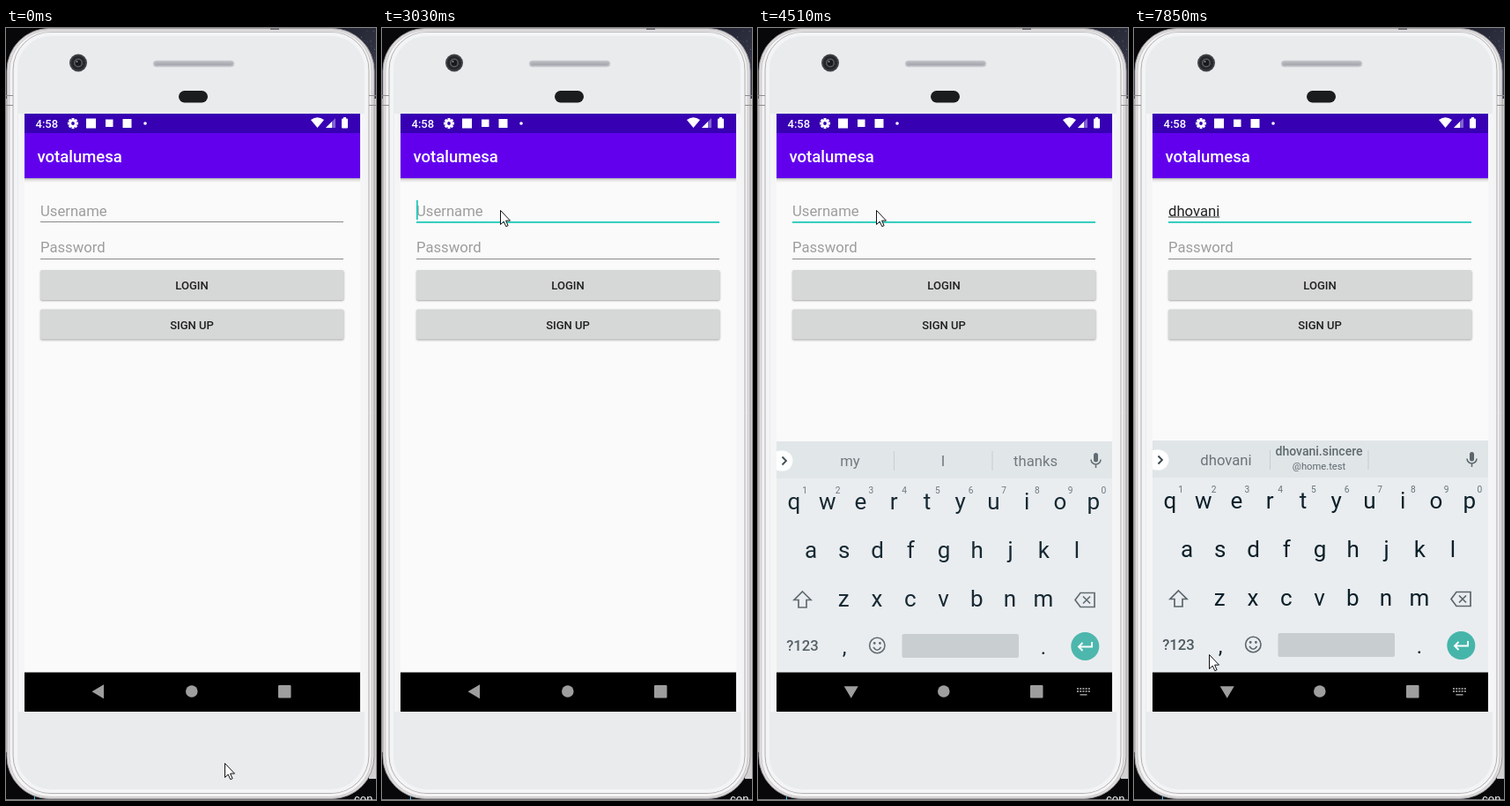
Recreate the animation shown at these times as an HTML page with a canvas. Size 420x874 px, loop 8 s.

```html
<!DOCTYPE html>
<html lang="en">
<head>
<meta charset="utf-8">
<title>Login form</title>
<style>
  html, body { margin: 0; width: 100%; height: 100%; overflow: hidden; background: #0a0a0c; }
  canvas { display: block; width: 420px; height: 874px; }
</style>
</head>
<body>
<canvas id="stage"></canvas>
<script>
const W = 420, H = 874, LOOP = 8000;
const canvas = document.getElementById('stage');
const ctx = canvas.getContext('2d');
const dpr = window.devicePixelRatio || 1;
canvas.width = W * dpr;
canvas.height = H * dpr;

const TEAL = '#22c9b8', GREY = '#5b666c', INK = '#0c2029';
const NAME = 'dhovani';

// Each track is a list of [start time, ...values]; values hold until the next entry.
const pointerTrack = [
  [0, 248, 832], [720, 244, 812], [870, 241, 775], [990, 240, 736],
  [1140, 239, 702], [1260, 238, 669], [1410, 238, 647], [1710, 212, 480],
  [1830, 165, 281], [2230, 143, 195], [2480, 141, 194], [2630, 137, 200],
  [2750, 134, 206], [7310, 127, 262], [7430, 107, 402], [7580, 96, 580],
  [7700, 85, 709]
];
const caretTrack = [
  [0, false], [3030, true], [4510, false], [4910, true], [5500, false],
  [5650, true], [6880, false], [7310, true], [7850, false]
];
const typedTrack = [[0, 0], [5650, 1], [5800, 3], [6080, 4], [6230, 6], [6360, 7]];
const keyboardTrack = [[0, 0, 0], [4390, 0.65, 6], [4510, 0.95, 1], [4630, 1, 0]];
const navTrack = [[0, 0, false], [4150, 0.5, false], [4270, 1, true]];
const hintTrack = [
  [0, 'my', 'I', 'thanks'], [5650, 'd', 'do', 'did'], [5800, 'dho', '', ''],
  [6080, 'dhov', '', 'shovel'], [6230, 'dhovan', '', ''], [6360, NAME, '', '']
];

function at(track, t) {
  let hit = track[0];
  for (const entry of track) if (entry[0] <= t) hit = entry;
  return hit.slice(1);
}

function rect(x, y, w, h, color) {
  ctx.fillStyle = color;
  ctx.fillRect(x, y, w, h);
}

function roundBox(x, y, w, h, r, fill, stroke, width = 1) {
  ctx.beginPath();
  ctx.roundRect(x, y, w, h, r);
  if (fill) { ctx.fillStyle = fill; ctx.fill(); }
  if (stroke) { ctx.strokeStyle = stroke; ctx.lineWidth = width; ctx.stroke(); }
}

function disc(x, y, r, color) {
  ctx.beginPath();
  ctx.arc(x, y, r, 0, Math.PI * 2);
  ctx.fillStyle = color;
  ctx.fill();
}

function fillPath(d, color) {
  ctx.fillStyle = color;
  ctx.fill(new Path2D(d));
}

function strokePath(d, color, width) {
  ctx.strokeStyle = color;
  ctx.lineWidth = width;
  ctx.stroke(new Path2D(d));
}

function setFont(size, weight = 400) {
  ctx.font = `${weight} ${size}px Roboto, sans-serif`;
}

function text(str, x, y, size, color, align = 'left', weight = 400) {
  setFont(size, weight);
  ctx.textAlign = align;
  ctx.fillStyle = color;
  ctx.fillText(str, x, y);
}

function gradient(x0, y0, x1, y1, stops) {
  const g = ctx.createLinearGradient(x0, y0, x1, y1);
  stops.forEach(([p, c]) => g.addColorStop(p, c));
  return g;
}

function drawBackdrop() {
  rect(0, 0, W, H, '#08080a');
  rect(370, 0, 50, 80, gradient(370, 0, 420, 60, [[0, '#20222f'], [1, '#393a4c']]));
  let seed = 7;
  const random = () => (seed = seed * 16807 % 2147483647) / 2147483647;
  for (let i = 0; i < 45; i++) {
    rect(385 + random() * 35, random() * 60, 1, 1, i % 3 ? '#4c4b5e' : '#74707c');
  }
  rect(0, 80, 10, 740, '#cfcccd');
  rect(412, 80, 8, 770, '#d3d0d1');
  rect(0, 873, W, 1, '#77777b');
  text('(', 31, 877, 12, '#65b8ec');
  text('con', 395, 877, 13, '#f2f2f2');
}

function drawPhone() {
  roundBox(1, 0.5, 417, 872, 48, '#dfddde', '#9c999b');
  roundBox(4, 2.5, 411, 868, 46, '#f5f4f5', '#cbc8ca');
  roundBox(8, 4.5, 404, 862, 43, '#e9ebed', '#b3b0b2');
  roundBox(11, 7, 398, 857, 40, null, '#f3f4f5', 4);
  rect(0, 76, 8, 1, '#8e8b8d');
  rect(0, 87, 8, 1, '#8e8b8d');
  rect(412, 76, 8, 1, '#8e8b8d');
  rect(412, 87, 8, 1, '#8e8b8d');
  rect(300, 0, 10, 2, '#77747a');
  rect(14, 97, 7, 677, '#f5f5f6');
  rect(402, 97, 6, 677, '#f5f5f6');

  disc(82, 39.5, 10, '#404247');
  disc(82, 39.5, 8, '#25262a');
  disc(82, 39.5, 5, '#5a5c62');
  disc(82, 39.5, 3.5, '#18191c');
  disc(80.5, 38, 1, '#8c9098');

  roundBox(167, 37, 92, 7, 3.5, '#b6b7bd', '#d5d6d9');
  rect(170, 40, 86, 2, '#a9aab1');
  roundBox(196, 71, 33, 13.5, 6.75, '#1b1c1e');
}

function drawGear(x, y) {
  ctx.save();
  ctx.translate(x, y);
  for (let i = 0; i < 8; i++) {
    rect(-1.5, -6, 3, 4, '#fff');
    ctx.rotate(Math.PI / 4);
  }
  ctx.restore();
  disc(x, y, 4.4, '#fff');
  disc(x, y, 1.9, '#3700b3');
}

function drawBars() {
  rect(21, 97, 381, 22, '#3700b3');
  text('4:58', 33.5, 112.5, 13, '#fff', 'left', 500);
  drawGear(76, 108);
  rect(91, 102.5, 11, 11, '#fff');
  rect(113, 103.5, 8.5, 8.5, '#fff');
  rect(132.5, 103, 10, 10, '#fff');
  disc(158, 108, 1.8, '#fff');
  fillPath('M346 104 Q353.5 98.5 361 104 L353.5 113 Z', '#fff');
  fillPath('M374 102 V113 H363 Z', '#8062cf');
  fillPath('M370 106 V113 H363 Z', '#fff');
  roundBox(381, 102.5, 7, 11, 1, '#fff');
  rect(383, 101, 3, 2, '#fff');

  rect(21, 119, 381, 51, '#6200ee');
  text('votalumesa', 35.5, 152, 18.5, '#fff', 'left', 500);
}

function drawButton(label, y) {
  ctx.save();
  ctx.shadowColor = 'rgba(0,0,0,.32)';
  ctx.shadowBlur = 2 * dpr;
  ctx.shadowOffsetY = dpr;
  roundBox(39, y, 344.5, 34, 2, '#d6d7d7');
  ctx.restore();
  text(label, 211, y + 22, 13, '#1f1f1f', 'center', 500);
}

function drawForm(t) {
  rect(21, 170, 381, 560, '#fafafa');
  rect(21, 170, 381, 5, gradient(0, 170, 0, 175,
    [[0, 'rgba(0,0,0,.3)'], [0.4, 'rgba(0,0,0,.1)'], [1, 'rgba(0,0,0,0)']]));

  const [count] = at(typedTrack, t);
  const typed = NAME.slice(0, count);
  if (t >= 3030) rect(39, 219, 344, 1.8, TEAL);
  else rect(39, 219, 344, 1, '#8a8a8a');
  text(typed || 'Username', 39, 212.5, 16.68, typed ? '#222' : '#9d9d9d');
  const end = 39 + (typed ? ctx.measureText(typed).width : 0);
  if (typed) rect(39, 213.5, end - 39, 1, '#333');
  if (at(caretTrack, t)[0]) rect(Math.round(end) - (typed ? 1 : 0), 195, 1.8, 22, TEAL);

  text('Password', 39, 254.2, 16.68, '#9d9d9d');
  rect(39, 261, 344, 1, '#8a8a8a');
  drawButton('LOGIN', 274);
  drawButton('SIGN UP', 318.5);
}

function drawHints(t) {
  rect(21, 467, 381, 42, '#e0e5e8');
  roundBox(14, 477.5, 25.5, 23, 11.5, '#fff');
  strokePath('M27.5 484.5 L32 489 L27.5 493.5', '#37444b', 1.8);
  rect(154, 478, 1, 22, '#c6cccf');
  rect(265.5, 478, 1, 22, '#c6cccf');

  const [left, middle, right] = at(hintTrack, t);
  text(left, 104.5, 495, 16.68, '#6a7478', 'center');
  text(right, 315, 495, 16.68, '#6a7478', 'center');
  if (middle) {
    text(middle, 210, 495, 16.68, '#6a7478', 'center');
  } else {
    text(NAME + '.sincere', 210, 483.5, 14, '#5f696e', 'center', 500);
    text('@home.test', 210, 500, 11.2, '#5f696e', 'center');
  }

  roundBox(381, 480, 5, 10.5, 2.5, GREY);
  strokePath('M378 487.5 A5.5 5.5 0 0 0 389 487.5 M383.5 493 V497', GREY, 1.5);
}

function drawKeys() {
  rect(21, 509, 381, 221, '#e9edf0');
  [['qwertyuiop', 41, 544], ['asdfghjkl', 60, 598.8], ['zxcvbnm', 97.3, 653.5]]
    .forEach(([row, x, y]) => [...row].forEach((key, i) =>
      text(key, x + i * 37.75, y, 26, INK, 'center')));
  [...'1234567890'].forEach((digit, i) =>
    text(digit, 53 + i * 37.7, 526, 10.2, '#66737a', 'center'));

  strokePath('M50.5 637 L60 646.5 H55 V655 H46 V646.5 H41 Z', GREY, 1.7);
  strokePath('M366 638.5 H382 V654.5 H366 L360 646.5 Z M369 642.5 L377 650.5 M377 642.5 L369 650.5', GREY, 1.7);

  text('?123', 50.5, 704.3, 16.7, '#4c595f', 'center', 500);
  text(',', 98, 707.5, 24, INK, 'center');
  text('.', 324, 707.5, 24, INK, 'center');
  strokePath('M144 698 A8.7 8.7 0 1 1 126.6 698 A8.7 8.7 0 1 1 144 698 M131 700 Q135.3 706.5 139.6 700', GREY, 1.6);
  disc(132.2, 695.5, 1.4, GREY);
  disc(138.4, 695.5, 1.4, GREY);
  roundBox(163.5, 685, 132.5, 27, 2, '#c8cdd0');
  disc(371.3, 699, 16, '#45b5aa');
  strokePath('M379 694 V699.5 H364 M368.5 695 L364 699.5 L368.5 704', '#fff', 1.9);
}

function drawKeyboard(t) {
  const [alpha, drop] = at(keyboardTrack, t);
  if (!alpha) return;
  ctx.save();
  ctx.beginPath();
  ctx.rect(21, 466, 381, 263.5);
  ctx.clip();
  ctx.globalAlpha = alpha;
  ctx.translate(0, drop);
  drawHints(t);
  drawKeys();
  ctx.restore();
}

function drawNav(t) {
  const [turn, hasIcon] = at(navTrack, t);
  rect(21, 729.5, 381, 44.5, '#000');
  ctx.save();
  ctx.translate(105 + turn * 0.7, 751.3);
  ctx.rotate(-turn * Math.PI / 2);
  fillPath('M-7.5 0 L6 -8 V8 Z', '#9e9e9e');
  ctx.restore();
  disc(210.8, 751, 6.8, '#9e9e9e');
  roundBox(309, 744, 14.5, 14.5, 1, '#9e9e9e');
  if (!hasIcon) return;
  for (let i = 0; i < 10; i++) {
    rect(362 + i % 5 * 3.2, 747 + (i > 4 ? 3 : 0), 2, 2, '#8c8c8c');
  }
  rect(365.5, 754, 8, 1.6, '#8c8c8c');
}

function drawPointer(t) {
  const [x, y] = at(pointerTrack, t);
  ctx.save();
  ctx.translate(x + 0.5, y + 0.5);
  const arrow = 'M0 0 V16 L3.7 12.6 L6.3 18.2 L8.6 17.2 L6.1 11.6 H11 Z';
  fillPath(arrow, '#fff');
  strokePath(arrow, '#111', 1);
  ctx.restore();
}

function draw(t) {
  ctx.setTransform(dpr, 0, 0, dpr, 0, 0);
  ctx.textBaseline = 'alphabetic';
  drawBackdrop();
  drawPhone();
  drawBars();
  drawForm(t);
  drawKeyboard(t);
  drawNav(t);
  drawPointer(t);
}

const start = performance.now();
function tick() {
  draw((performance.now() - start) % LOOP);
  requestAnimationFrame(tick);
}
tick();
</script>
</body>
</html>
```
